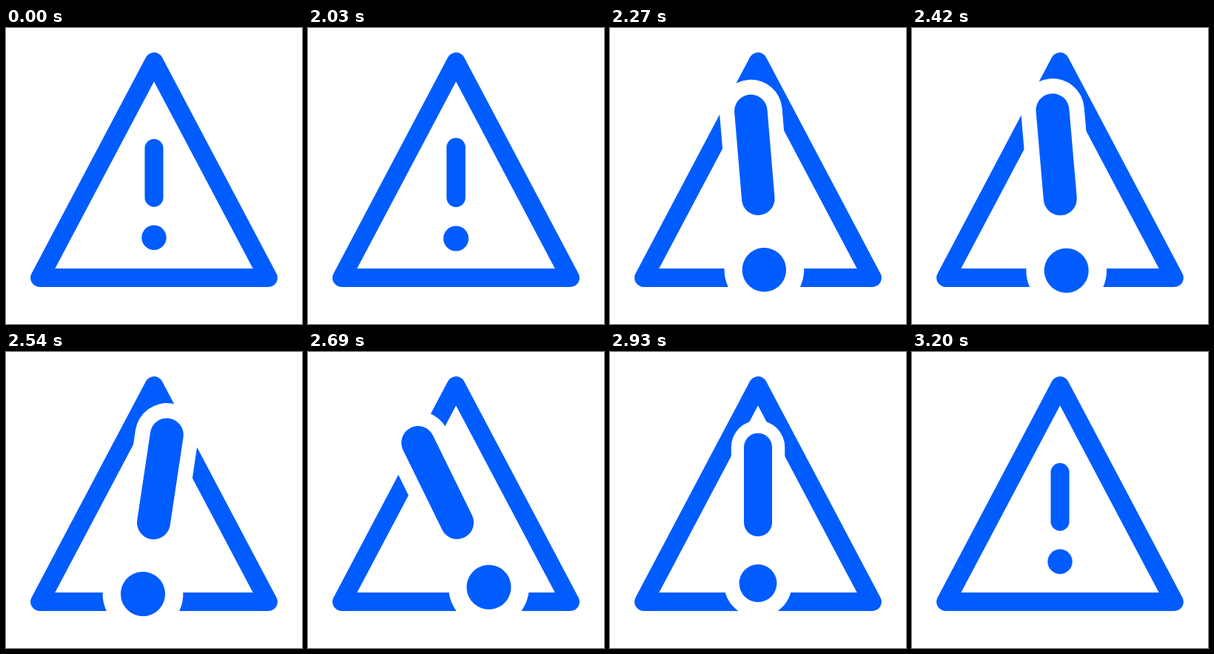
Recreate the animation shown at these times as an HTML page without scripts. Size 400 px wide and 400 px high, loop 3.23 s.

```html
<!DOCTYPE html>
<html lang="en">
<head>
<meta charset="utf-8">
<title>Warning</title>
<style>
  html, body { margin: 0; height: 100%; overflow: hidden; background: #fff; }
  svg { display: block; width: 100vw; height: 100vh; }
  .line { fill: none; stroke: #005cff; stroke-width: 25; stroke-linecap: round; stroke-linejoin: round; }
  .dot { fill: #005cff; }
  .halo .line { stroke: #fff; stroke-width: 47.6; }
  .halo .dot { fill: #fff; }

  .mark {
    transform-origin: 200px 227.3px;
    animation: grow 3230ms infinite, swing 3230ms infinite;
    animation-timing-function: cubic-bezier(.37, 0, .63, 1);
  }
  @keyframes grow {
    0%, 61.92% { scale: 1; }
    71.21%, 85.14% { scale: 1.8; }
    99.07%, 100% { scale: 1; }
  }
  @keyframes swing {
    0%, 69.49% { rotate: 0deg; }
    72.6% { rotate: -30deg; }
    77.24% { rotate: 19deg; }
    81.89% { rotate: -30deg; }
    87.93%, 100% { rotate: 0deg; }
  }
</style>
</head>
<body>
<svg viewBox="0 0 400 400">
  <path class="line" d="M200 45.6 354.4 337.5H45.6Z"/>
  <g class="mark">
    <g class="halo">
      <path class="line" d="M200 162.5V229.2"/>
      <circle class="dot" cx="200" cy="283.3" r="30.2"/>
    </g>
    <path class="line" d="M200 162.5V229.2"/>
    <circle class="dot" cx="200" cy="283.3" r="16.7"/>
  </g>
</svg>
</body>
</html>
```
